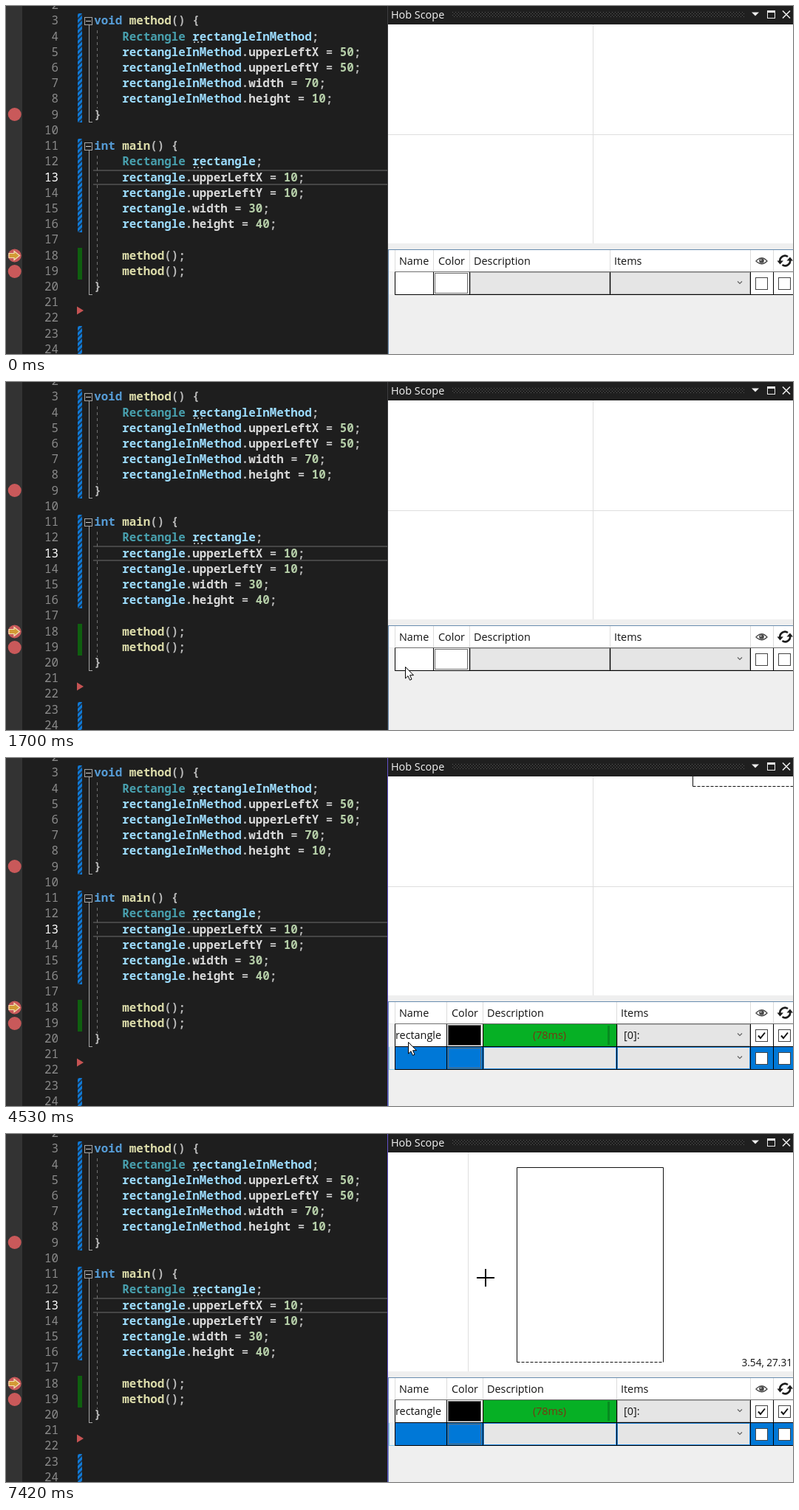
An HTML page for the animation above (8 s loop, 1065 by 472 pixels).

```html
<!DOCTYPE html>
<html lang="en">
<head>
<meta charset="utf-8">
<title>Debugger watch panel</title>
<style>
  html, body { margin: 0; width: 100%; height: 100%; overflow: hidden; background: #1e1e1e; }
  svg { display: block; width: 1065px; height: 472px; }
  text { white-space: pre; }
  .code { font: 600 15.83px "Noto Sans Mono", "DejaVu Sans Mono", monospace; }
  .line { font-weight: 500; }
  .ui { font: 14.4px "Open Sans", "Noto Sans", sans-serif; }
  .small { font-size: 13.6px; }
  rect, .crisp { shape-rendering: crispEdges; }
</style>
</head>
<body>
<svg viewBox="0 0 1065 472" xmlns="http://www.w3.org/2000/svg">
  <defs>
    <pattern id="hatch" width="5" height="5" patternUnits="userSpaceOnUse" patternTransform="rotate(45)">
      <rect width="5" height="5" fill="#0f7ad8"/>
      <rect width="1.7" height="5" fill="#1d3750"/>
    </pattern>
    <pattern id="grip" x="604" y="8" width="4" height="4" patternUnits="userSpaceOnUse">
      <rect width="1" height="1" fill="#585858"/>
      <rect x="2" y="2" width="1" height="1" fill="#585858"/>
    </pattern>
    <clipPath id="plot"><rect x="517" y="25" width="548" height="297"/></clipPath>
  </defs>
  <g id="editor"></g>
  <g id="panel"></g>
</svg>
<script>
const LOOP = 8000;
const BLUE = '#0078d7', GREEN = '#06b025';
const at = { select: 1800, edit: 1940, type: 2850, commit: 4400, result: 4460,
             pointer: 4530, menu: 5770, pick: 6350, fit: 6440 };

const rect = (x, y, w, h, fill, extra = '') =>
  `<rect x="${x}" y="${y}" width="${w}" height="${h}" fill="${fill}" ${extra}/>`;
const frame = (x, y, w, h, fill, stroke) =>
  rect(x + .5, y + .5, w - 1, h - 1, fill, `stroke="${stroke}"`);
const path = (d, stroke, width = 1, extra = '') =>
  `<path d="${d}" fill="none" stroke="${stroke}" stroke-width="${width}" ${extra}/>`;
const label = (x, y, s, fill = '#111', extra = '') =>
  `<text class="ui" x="${x}" y="${y}" fill="${fill}" ${extra}>${s}</text>`;

// ---------- code editor ----------
const program = {
  3: 'void method() {',
  4: '    Rectangle rectangleInMethod;',
  5: '    rectangleInMethod.upperLeftX = 50;',
  6: '    rectangleInMethod.upperLeftY = 50;',
  7: '    rectangleInMethod.width = 70;',
  8: '    rectangleInMethod.height = 10;',
  9: '}',
  11: 'int main() {',
  12: '    Rectangle rectangle;',
  13: '    rectangle.upperLeftX = 10;',
  14: '    rectangle.upperLeftY = 10;',
  15: '    rectangle.width = 30;',
  16: '    rectangle.height = 40;',
  18: '    method();',
  19: '    method();',
  20: '}'
};
const syntax = [
  [/^(void|int)\b/, '#569cd6'],
  [/^Rectangle/, '#48a0ae'],
  [/^(method|main)/, '#dcdcaa'],
  [/^rectangle\w*/, '#9cdcfe'],
  [/^\d+/, '#b5cea8'],
  [/^\w+/, '#dadada'],
  [/^[^\w]+/, '#b9b9b9']
];

function colorize(line) {
  let out = '';
  while (line) {
    const [rule, color] = syntax.find(([r]) => r.test(line));
    const token = line.match(rule)[0];
    out += `<tspan fill="${color}">${token}</tspan>`;
    line = line.slice(token.length);
  }
  return out;
}

function foldRegion(top, bottom) {
  return path(`M112.5 ${top + 11}V${bottom + .5}H117`, '#a5a5a5', 1, 'class="crisp"')
    + frame(106, top, 11, 11, '#1e1e1e', '#a5a5a5')
    + rect(108, top + 5, 7, 1, '#d0d0d0')
    + path(`M123.5 ${top + 18}V${bottom - 18}`, '#707070', 1, 'stroke-dasharray="4 4" class="crisp"');
}

function editorMarkup() {
  let s = rect(0, 0, 517, 472, '#1e1e1e') + rect(0, 0, 22, 472, '#333');
  for (const [y, h] of [[10, 148], [180, 127], [434, 38]]) s += rect(97, y, 6, h, 'url(#hatch)');
  s += rect(97, 328, 6, 43, '#0f5f0f');
  s += rect(118, 222, 399, 2, '#464646') + rect(118, 241, 399, 2, '#464646');
  s += foldRegion(15, 157) + foldRegion(185, 391);
  for (let n = 2; n <= 24; n++) {
    const y = (25.3 + (n - 3) * 21.22).toFixed(2);
    s += `<text class="code line" x="71" y="${y}" text-anchor="end" fill="${n === 13 ? '#fff' : '#8a8a8a'}">${n}</text>`;
    if (program[n]) s += `<text class="code" x="119.3" y="${y}">${colorize(program[n])}</text>`;
  }
  for (const y of [48, 218])
    for (const x of [254, 259, 264]) s += rect(x, y, 2, 2, '#a0a0a0');
  for (const y of [147, 338.5, 360]) s += `<circle cx="11.7" cy="${y}" r="9" fill="#c9595a"/>`;
  s += '<path d="M4 335.5H11V332.5L18.5 338.5L11 344.5V341.5H4Z" fill="#d39a35" stroke="#f3e0b4" stroke-width="1.2"/>';
  return s + '<path d="M96 407.5L105 413L96 418.5Z" fill="#c65353"/>';
}

// ---------- watch panel ----------
const ruler = document.createElement('canvas').getContext('2d');
function textWidth(s) {
  ruler.font = '14.4px "Open Sans", "Noto Sans", sans-serif';
  return ruler.measureText(s).width;
}

function titleBar(focused) {
  return rect(517, 0, 548, 25, '#1f1f1f')
    + rect(516, 0, 1, 472, focused ? '#6250c8' : '#3d3d40')
    + label(521, 17, 'Hob Scope', '#f4f4f4')
    + rect(604, 8, 395, 7, 'url(#grip)')
    + '<path d="M1009 8.5H1019L1014 13.5Z" fill="#eee"/>'
    + frame(1030, 6, 11, 11, 'none', '#eee') + rect(1030, 6, 11, 3, '#eee')
    + path('M1051 6.5L1061 16.5M1061 6.5L1051 16.5', '#eee', 1.6);
}

const viewAt = t => t < at.fit
  ? { ox: 794, oy: 174.2, k: 13.55 }
  : { ox: 625.64, oy: 375.25, k: 6.6 };

function plot(t, pointer) {
  const v = viewAt(t), snap = n => Math.floor(n) + .5;
  const px = x => snap(v.ox + x * v.k), py = y => snap(v.oy - y * v.k);
  let s = rect(517, 25, 548, 297, '#fff')
    + path(`M${px(0)} 25V322M517 ${py(0)}H1065`, '#dedede');
  if (t >= at.result) {
    s += path(`M${px(10)} ${py(10)}V${py(50)}H${px(40)}V${py(10)}`, '#111')
      + path(`M${px(10)} ${py(10)}H${px(40)}`, '#111', 1, 'stroke-dasharray="4 2"');
  }
  if (pointer.kind === 'cross') {
    const cx = ((pointer.x - v.ox) / v.k).toFixed(2), cy = ((v.oy - pointer.y) / v.k).toFixed(2);
    s += `<text class="ui small" x="1064" y="314.5" text-anchor="end" fill="#111">${cx}, ${cy}</text>`;
  }
  return `<g clip-path="url(#plot)">${s}</g>`;
}

function columns(nameWidth) {
  const color = 526 + nameWidth, desc = color + 49;
  return { name: 526, color, desc, items: Math.round((desc + 1007) / 2), eye: 1007, sync: 1038 };
}

function header(c) {
  let s = rect(517, 322, 548, 150, '#efefef')
    + rect(517, 330, 548, 1, '#688caf') + rect(517, 330, 1, 142, '#688caf')
    + rect(518, 331, 547, 29, '#fff') + rect(526, 360, 539, 1, '#707070');
  for (const x of Object.values(c)) s += rect(x, 331, 1, 29, '#dcdcdc');
  s += label(c.name + 6, 351, 'Name') + label(c.color + 7, 351, 'Color')
    + label(c.desc + 6, 351, 'Description') + label(c.items + 6, 351, 'Items');
  s += path('M1015 346Q1022.5 337.5 1030 346Q1022.5 353.5 1015 346Z', '#4a4a4a', 1.3)
    + '<circle cx="1022.5" cy="345.5" r="3.3" fill="#4a4a4a"/><circle cx="1021.5" cy="344.5" r="1" fill="#ddd"/>';
  return s + path('M1047.5 347A6.8 6.8 0 0 1 1058 340M1061 344A6.8 6.8 0 0 1 1050.5 351', '#1c1c1c', 2.6)
    + '<path d="M1043.5 345.5H1052L1047.5 350.5ZM1056.5 345.5H1065L1061 340.5Z" fill="#1c1c1c"/>';
}

function checkbox(x, y, checked) {
  return frame(x, y, 17, 17, '#fff', '#444')
    + (checked ? path(`M${x + 4} ${y + 8.5}L${x + 7} ${y + 12}L${x + 13} ${y + 4.5}`, '#111', 2) : '');
}

function row(y, c, o) {
  const bg = o.selected ? BLUE : o.plain || '#fff';
  const edge = o.selected ? '#2b90e6' : '#b4b4b4';
  let s = rect(518, y, 8, 30, o.mark || '#f6f6f6') + rect(526, y, 539, 30, bg);
  s += frame(c.color + 2, y + 1, 45, 28, o.swatch || bg, '#6c6c6c');
  s += frame(c.desc + 1, y, c.items - c.desc - 1, 30, o.green ? GREEN : '#e6e6e6', o.green ? '#08a324' : edge);
  if (o.strip) s += rect(814, y + 2, 3, 26, '#078a20');
  if (o.note) s += label((c.desc + c.items) / 2, y + 20, o.note, '#7a3512', 'text-anchor="middle"');
  s += frame(c.items + 1, y, 1006 - c.items, 30, '#e5e5e5', edge)
    + path(`M990 ${y + 12.5}L993 ${y + 15.5}L996 ${y + 12.5}`, '#606060', 1.1);
  if (o.item) s += label(c.items + 10, y + 20, o.item);
  s += checkbox(1014, y + 7, o.checked) + checkbox(1045, y + 7, o.checked);
  for (const x of Object.values(c)) s += rect(x, y, 1, 31, '#000');
  s += rect(526, y + 30, 539, 1, '#000');
  if (o.name) s += label(527, y + 20, o.name);
  if (o.edit !== undefined) {
    s += frame(526, y, c.color - 525, 31, '#fff', '#000') + label(530, y + 17, o.edit);
    if (o.caret) s += rect(Math.round(529 + textWidth(o.edit)), y + 1, 1, 20, '#000');
  }
  return s;
}

const word = 'rectangle';
const keyTimes = [2850, 2970, 3100, 3360, 3450, 3550, 3650, 3750, 3860];

function table(t, pointer) {
  const pressed = keyTimes.filter(k => k <= t);
  const typed = word.slice(0, pressed.length);
  const c = columns(Math.max(52, Math.round(textWidth(typed) + 8)));
  let s = header(c);
  if (t < at.commit) {
    const editing = t >= at.edit, picked = t >= at.select;
    const lastKey = Math.max(at.edit, ...pressed);
    const hover = pointer.kind === 'resize' || (pointer.kind === 'arrow' && pointer.x < 526 && pointer.y < 391);
    s += row(361, c, {
      selected: picked, green: editing, checked: editing, strip: typed.length > 6,
      mark: hover ? '#bfe8fb' : picked ? '#e9f1f6' : '',
      edit: editing ? typed : undefined,
      caret: (t - lastKey) % 1060 < 530
    });
  } else {
    const inMenu = t >= at.menu && t < at.pick, done = t >= at.result;
    s += row(361, c, { name: word, swatch: '#000', green: true, strip: true, checked: true,
      note: done ? '(78ms)' : '', item: done ? '[0]:' : '' });
    s += row(392, c, { selected: !inMenu, plain: '#f0f0f0', mark: '#e9f1f6' });
    s += path('M518.5 392V422.5H526', '#8fd0ee', 1, 'class="crisp"');
  }
  return s;
}

function menu(t, pointer) {
  if (t < at.menu || t >= at.pick) return '';
  let s = '';
  for (let i = 4; i > 0; i--) s += rect(453 + i, 179 + i, 199, 58, '#000', 'opacity=".16"');
  s += frame(450, 175, 203, 63, '#f2f2f2', '#979797') + rect(488, 178, 1, 57, '#dedede');
  if (pointer.x < 651 && pointer.y > 180) s += frame(452, 181, 198, 26, '#cde4f6', '#7fbde8');
  return s + label(498, 199, 'Autofit') + label(498, 226, 'Toggle Sense');
}

// ---------- pointer ----------
const stops = [
  [150, 809, 462], [240, 709, 429], [410, 709, 429], [600, 632, 454], [820, 548, 438],
  [1010, 521, 405], [1150, 522, 386], [1240, 522, 386], [1420, 473, 396], [1700, 540, 386],
  [1780, 544, 385], [5440, 544, 385], [5570, 653, 175], [5770, 653, 175], [5890, 660, 175],
  [5980, 662, 162], [6180, 644, 187], [6830, 644, 187], [7100, 652, 190], [7420, 649, 195]
];

function pointerAt(t) {
  let i = stops.findIndex(s => s[0] > t);
  if (i < 0) i = stops.length;
  const a = stops[Math.max(0, i - 1)], b = stops[Math.min(i, stops.length - 1)];
  const u = b[0] > a[0] ? Math.max(0, (t - a[0]) / (b[0] - a[0])) : 0;
  const e = u * u * (3 - 2 * u);
  const x = Math.round(a[1] + (b[1] - a[1]) * e), y = Math.round(a[2] + (b[2] - a[2]) * e);
  let kind = 'arrow';
  if (t < 150 || (t >= at.type && t < at.pointer)) kind = 'none';
  else if (t >= at.menu && t < at.pick) kind = 'arrow';
  else if (x < 516) kind = 'beamLight';
  else if (y > 24 && y < 322) kind = 'cross';
  else if (t >= at.edit && t < at.type) kind = 'beam';
  else if (x < 527 && y > 380 && y < 397) kind = 'resize';
  return { x, y, kind };
}

const beam = color => path('M-3 -7.5H-1L.5 -6.5L2 -7.5H4M.5 -6.5V6.5M-3 7.5H-1L.5 6.5L2 7.5H4', color, 1.2);
const shapes = {
  none: '',
  arrow: '<path d="M.5 .5V16L4 12.7L6.5 18.3L9 17.2L6.6 11.7H11.5Z" fill="#fff" stroke="#000"/>',
  beam: beam('#000'),
  beamLight: beam('#eee'),
  cross: rect(-12, -1, 24, 2, '#000') + rect(-1, -12, 2, 24, '#000'),
  resize: '<path d="M.5 -11L5 -6H2V6H5L.5 11L-4 6H-1V-6H-4Z" fill="#fff" stroke="#000"/>'
};

// ---------- loop ----------
const panel = document.getElementById('panel');
document.getElementById('editor').innerHTML = editorMarkup();

function draw(t) {
  const p = pointerAt(t);
  panel.innerHTML = titleBar(t >= at.select) + plot(t, p) + table(t, p) + menu(t, p)
    + `<g transform="translate(${p.x} ${p.y})">${shapes[p.kind]}</g>`;
}

const start = performance.now();
function tick() {
  draw((performance.now() - start) % LOOP);
  requestAnimationFrame(tick);
}
tick();
</script>
</body>
</html>
```
